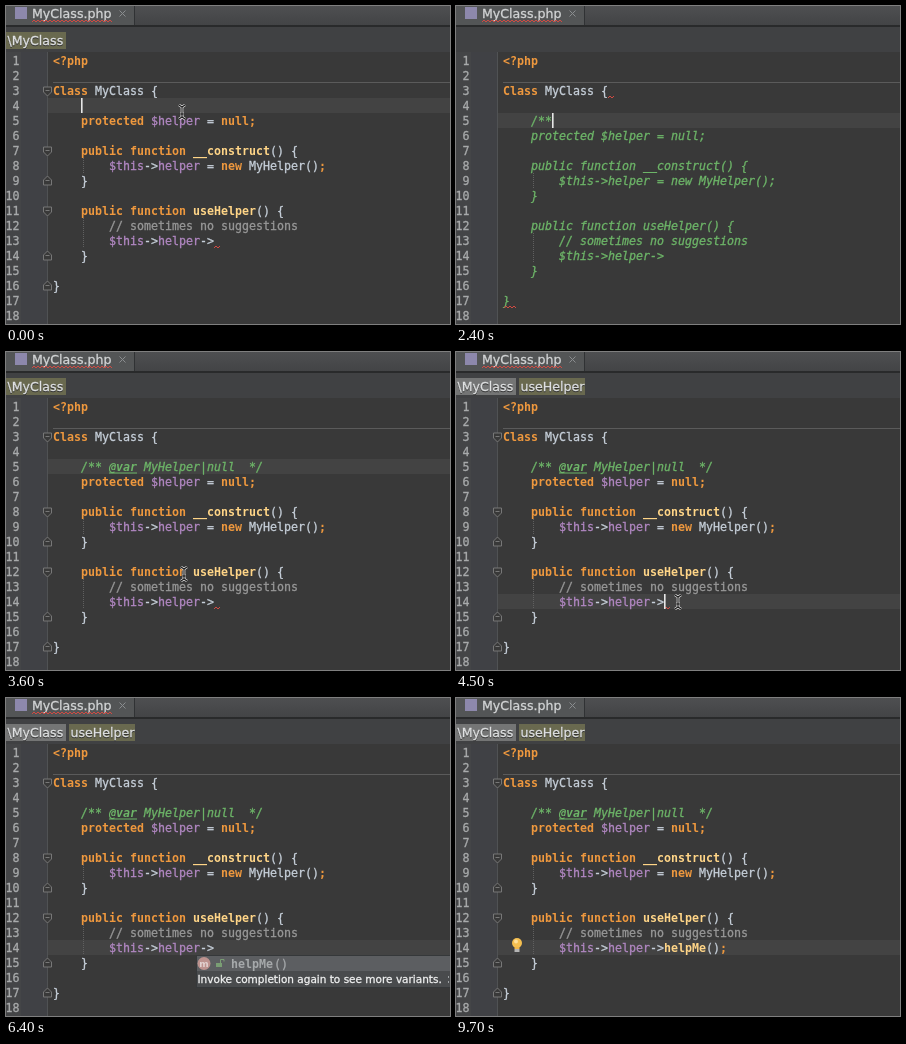
Animation of 444x318 px, one loop 9900 ms. Source, as an HTML page with a canvas:

```html
<!DOCTYPE html>
<html lang="en">
<head>
<meta charset="utf-8">
<title>Code completion</title>
<style>
  html, body { margin: 0; width: 100%; height: 100%; overflow: hidden; background: #393939; }
  canvas { display: block; width: 444px; height: 318px; }
</style>
</head>
<body>
<canvas id="stage"></canvas>
<script>
const W = 444, H = 318, LOOP = 9900;
const LEFT = 47, CHAR = 7, ROW = 15, TOP = 47;
const MONO = '11.63px "DejaVu Sans Mono", monospace';
const SANS = '"DejaVu Sans", sans-serif';
const COLOR = {
  plain: '#c6cfd9', keyword: '#ee983e', field: '#b187c2', method: '#ffd587',
  comment: '#989898', doc: '#6db568', error: '#d24a42'
};

const canvas = document.getElementById('stage');
const ctx = canvas.getContext('2d');
const ratio = window.devicePixelRatio || 1;
canvas.width = W * ratio;
canvas.height = H * ratio;
ctx.scale(ratio, ratio);

const colX = col => LEFT + col * CHAR;
const rowY = row => TOP + (row - 1) * ROW;

function rect(x, y, w, h, color) {
  ctx.fillStyle = color;
  ctx.fillRect(x, y, w, h);
}

// Regular weights get a hairline outline for a heavier, smoothed look.
function text(str, x, y, color, font = MONO, align = 'left') {
  ctx.font = font;
  ctx.textAlign = align;
  ctx.fillStyle = ctx.strokeStyle = color;
  ctx.fillText(str, x, y);
  if (font.includes('bold')) return;
  ctx.lineWidth = .3;
  ctx.strokeText(str, x, y);
}

function path(points, stroke, fill, width = 1, close = false) {
  ctx.beginPath();
  points.forEach(([x, y]) => ctx.lineTo(x, y));
  if (close) ctx.closePath();
  if (fill) { ctx.fillStyle = fill; ctx.fill(); }
  ctx.strokeStyle = stroke;
  ctx.lineWidth = width;
  ctx.stroke();
}

function disc(x, y, r, color) {
  ctx.fillStyle = color;
  ctx.beginPath();
  ctx.arc(x, y, r, 0, Math.PI * 2);
  ctx.fill();
}

function wave(x, y, w) {
  const points = [];
  for (let i = 0; i <= w; i += 2) points.push([x + i, y + (i % 4 ? 0 : 2)]);
  path(points, COLOR.error);
}

const TOKEN = /(?<comment>\/\/.*)|(?<keyword><\?php|\b(?:Class|protected|public|function|new|null)\b|;)|(?<field>\$\w+|\bhelper\b)|(?<method>__construct|useHelper|helpMe)|(?<plain>[^\s$;]+?(?=\b|\s|$)|.)/g;

function codeLine(str, row) {
  for (const m of str.matchAll(TOKEN)) {
    const kind = Object.keys(m.groups).find(k => m.groups[k] !== undefined);
    const bold = kind === 'keyword' || kind === 'method';
    text(m[0], colX(m.index), rowY(row) + 12, COLOR[kind], (bold ? 'bold ' : '') + MONO);
  }
}

function docLine(str, row) {
  const y = rowY(row) + 12;
  let col = 0;
  for (const part of str.split(/(@var\b)/)) {
    const tag = part === '@var';
    text(part, colX(col), y, COLOR.doc, (tag ? 'bold italic ' : 'italic ') + MONO);
    if (tag) rect(colX(col), y + 1.5, 4 * CHAR, 1, COLOR.doc);
    col += part.length;
  }
}

const DOC_BODY = '@var MyHelper|null ';
const within = (t, spans) => spans.some(([a, b]) => t >= a && t < b);

function docAt(t) {
  if (t < 1600) return '';
  if (t < 1900) return '/';
  if (t < 2200) return '/*';
  if (t < 2500) return '/**';
  const typed = Math.min(DOC_BODY.length, Math.floor((t - 2500) / 50));
  return '/** ' + DOC_BODY.slice(0, typed) + ' */';
}

function callAt(t) {
  if (t < 6600) return '';
  return t < 7000 ? 'helpMe()' : 'helpMe();';
}

function sourceAt(t) {
  const lines = [
    '<?php', '', 'Class MyClass {', '',
    '    protected $helper = null;', '',
    '    public function __construct() {',
    '        $this->helper = new MyHelper();',
    '    }', '',
    '    public function useHelper() {',
    '        // sometimes no suggestions',
    '        $this->helper->' + callAt(t),
    '    }', '', '}'
  ];
  if (t >= 700) lines.splice(4, 0, '    ' + docAt(t));
  return lines;
}

function drawFold(row, up) {
  const y = rowY(row) + 8, s = up ? -1 : 1;
  path([[37.5, y - 4 * s], [45.5, y - 4 * s], [45.5, y + s], [41.5, y + 5 * s], [37.5, y + s]],
    '#777', '#393939', 1, true);
  path([[39.5, y - .5], [43.5, y - .5]], '#777');
}

function drawChrome(t) {
  const shade = ctx.createLinearGradient(0, 0, 0, 19);
  shade.addColorStop(0, '#4e4f51');
  shade.addColorStop(1, '#434446');
  rect(0, 0, W, 19, shade);
  rect(0, 0, 128, 19, '#535556');
  rect(128, 0, 1, 19, '#303234');
  rect(0, 19, W, 2, '#292a2b');
  rect(0, 21, W, 25, '#404143');

  rect(9, 1, 12, 12, '#8d88ac');
  text('MyClass.php', 26, 12, '#d2d4d5', '12.6px ' + SANS);
  if (t < 7500) wave(26, 14, 80);
  path([[113.5, 4.5], [119.5, 10.5]], '#8a8d8f');
  path([[119.5, 4.5], [113.5, 10.5]], '#8a8d8f');

  if (within(t, [[2200, 3000]])) return;
  const inMethod = t >= 4400;
  crumb('\\MyClass', 0, 60, inMethod ? '#747575' : '#69694f');
  if (inMethod) crumb('useHelper', 63, 66, '#69694f');
}

function crumb(label, x, w, color) {
  rect(x, 26, w, 17, color);
  text(label, x + 1.5, 40, '#333', '12.6px ' + SANS);
  text(label, x + 1.5, 39, '#dfe1e2', '12.6px ' + SANS);
}

function drawPopup() {
  rect(190, 257, W - 190, 33, '#35383a');
  rect(191, 258, W - 191, 15, '#5c5e61');
  rect(191, 273, W - 191, 16, '#494b4d');
  disc(198, 265.5, 6.5, '#bd938f');
  text('m', 198, 269, '#e2d2d0', 'bold 9px ' + SANS, 'center');
  rect(210, 265, 6, 4, '#7a9e74');
  path([[214.5, 265], [214.5, 261.5], [218, 261.5], [218, 263.5]], '#7a9e74');
  text('helpMe', 225, 270, '#a6a9ab', 'bold ' + MONO);
  text('()', 268, 270, '#a6a9ab');
  text('Invoke completion again to see more variants.', 191.5, 285, '#f0f1f1', '10.5px ' + SANS);
  rect(442, 278, 1, 2, '#9ca0a2');
  rect(442, 283, 1, 2, '#9ca0a2');
}

function drawBulb() {
  disc(61, 245, 5, '#f5bf50');
  disc(60, 243.5, 2, '#ffe09a');
  rect(58.5, 249, 5, 2, '#f0b64a');
  rect(58.5, 251, 5, 3, '#b4b4b4');
}

// Pointer stops: time, x, y.
const POINTER = [[3400, 215, 185], [3600, 178, 222], [3800, 180, 226], [4200, 222, 250], [4600, 222, 250]];

function pointerAt(t) {
  if (t < 400) return [176, 106];
  const i = POINTER.findIndex(([time]) => time > t);
  if (i < 1) return null;
  const [a, ax, ay] = POINTER[i - 1], [b, bx, by] = POINTER[i];
  const k = (t - a) / (b - a), e = k * k * (3 - 2 * k);
  return [ax + (bx - ax) * e, ay + (by - ay) * e];
}

function drawPointer([x, y]) {
  for (const [color, width] of [['#e8e8e8', 2.6], ['#111', 1.1]]) {
    path([[x - 3, y - 7], [x, y - 5], [x, y + 5], [x - 3, y + 7]], color, null, width);
    path([[x + 3, y - 7], [x, y - 5]], color, null, width);
    path([[x, y + 5], [x + 3, y + 7]], color, null, width);
    path([[x - 2, y + 2], [x + 2, y + 2]], color, null, width);
  }
}

const CARET_ON = [[0, 100], [700, 1200], [1600, 3500], [4300, 4800], [5100, 5700],
  [6200, 6400], [6600, 8500], [9000, 9500]];

function caretAt(t) {
  if (t < 700) return [4, 4];
  if (t >= 4300) return [14, 23 + callAt(t).length];
  const doc = docAt(t);
  return [5, 4 + doc.length - (t >= 2500 ? 3 : 0)];
}

function draw(t) {
  const shift = t >= 700 ? 1 : 0;
  const open = within(t, [[1900, 2500]]);
  const lines = sourceAt(t);
  const [row, col] = caretAt(t);
  const callRow = 13 + shift;

  rect(0, 0, W, H, '#393939');
  rect(0, 46, 15, H - 46, '#444547');
  rect(15, 46, 26, H - 46, '#404145');
  rect(41, 46, 1, H - 46, '#505254');
  rect(42, rowY(row), W - 42, ROW, '#434343');
  rect(LEFT, 76, W - LEFT, 1, '#5b5b5b');
  drawChrome(t);

  for (let n = 1; n <= 18; n++) text(n, 13.5, rowY(n) + 12, '#a8aaab', MONO, 'right');

  for (const [first, count] of [[8, 1], [12, 2]])
    for (let y = rowY(first + shift); y < rowY(first + shift + count); y += 2)
      rect(77, y, 1, 1, '#606060');

  lines.forEach((line, i) => {
    const n = i + 1;
    if ((open && n >= 5) || /^\s*\/\*/.test(line)) docLine(line, n);
    else codeLine(line, n);
  });

  if (!open) {
    [3, 7 + shift, 11 + shift].forEach(n => drawFold(n, false));
    [9 + shift, 14 + shift, 16 + shift].forEach(n => drawFold(n, true));
  }

  if (within(t, [[1700, 2500]])) wave(152, rowY(3) + 13, 7);
  if (open) wave(48, rowY(17) + 13, 13);
  else if (t < 5100) wave(208, rowY(callRow) + 13, 7);
  else if (within(t, [[6600, 7000]])) wave(264, rowY(14) + 13, 6);

  if (within(t, [[5200, 6600]])) drawPopup();
  if (t >= 7800) drawBulb();
  if (within(t, CARET_ON)) rect(colX(col), rowY(row), 1.6, ROW, '#e6e6e6');
  const pointer = pointerAt(t);
  if (pointer) drawPointer(pointer);
}

function tick() {
  draw(performance.now() % LOOP);
  requestAnimationFrame(tick);
}
tick();
</script>
</body>
</html>
```
